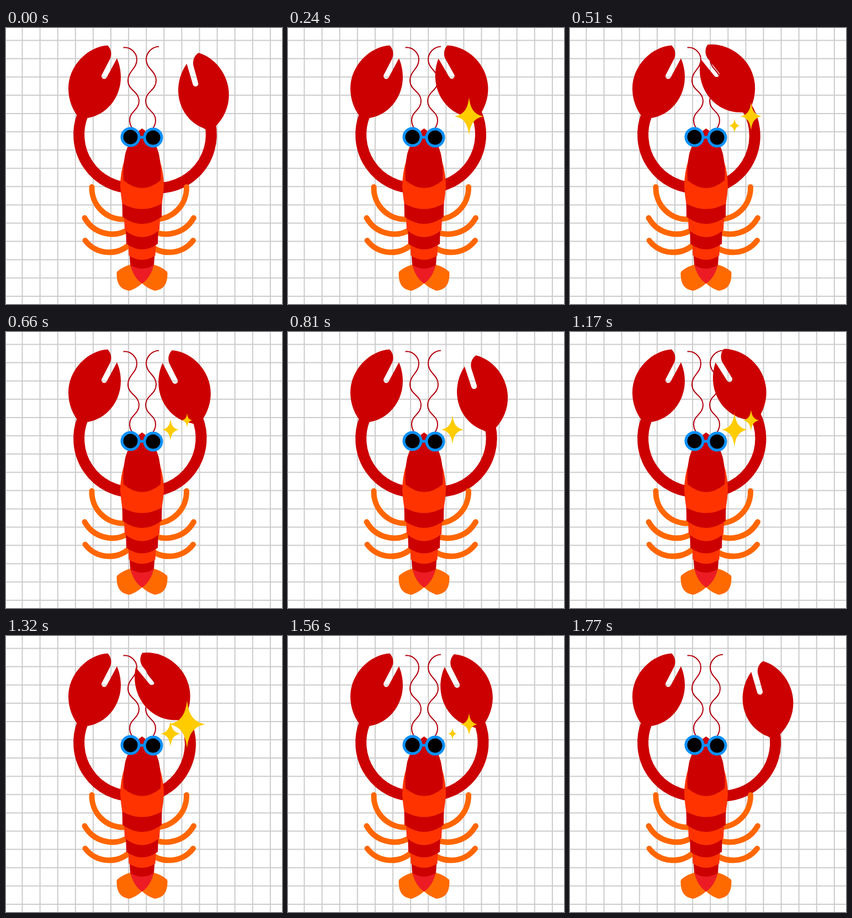
Write an HTML page that moves like this. It is 500 by 500 pixels and loops after 1.8 s.

```html
<!DOCTYPE html>
<html>
<head>
<meta charset="utf-8">
<title>Lobster</title>
<style>
html, body { margin: 0; width: 100%; height: 100%; overflow: hidden; background: #fff; }
svg { display: block; width: 100vw; height: 100vh; }
.line { fill: none; }
</style>
</head>
<body>
<svg viewBox="0 0 500 500">
  <defs>
    <path id="claw" fill="#c00" d="M184 31.5 C148 34 113 68 113 110 C113 132 122 151 133 164 C138 165 143 165 148 163 C181 158 208 127 208 89 C208 76 205 64 201 55 L182.500 89.500 A5 5 0 0 1 173.500 85 L188.500 56 C192 48 191 38 184 31.500Z"/>
    <g id="legs" class="line" stroke="#f60" stroke-width="10" stroke-linecap="round">
      <path d="M155.500 288 A57 57 0 0 0 216 346.500"/>
      <path d="M142.500 344 A57 57 0 0 0 222 365"/>
      <path d="M143.500 385 A55 55 0 0 0 224 392"/>
    </g>
    <path id="fin" fill="#ff6a00" d="M230 428 Q215 430 203 440 Q200 441 200.500 447 Q201 474 224 476 Q238 471 247 462 L247 434Z"/>
    <path id="star" fill="#fc0" d="M0 -1.3 C.1 -.45 .4 -.12 1 0 C.4 .12 .1 .45 0 1.3 C-.1 .45 -.4 .12 -1 0 C-.4 -.12 -.1 -.45 0 -1.3Z"/>
  </defs>

  <path id="grid" class="line" stroke="#ccc" stroke-width="2"/>

  <g class="line" stroke="#b3000c" stroke-width="2">
    <path d="M212.500 35.500 C226 34 237 45 237 57 C237 74 221 78 221 95 C221 113 241 115 241 132 C241 149 224 151 224 167 Q224 175 229 182"/>
    <path d="M277 33.500 C264 34 254 45 254 57 C254 74 272 78 272 95 C272 113 253 115 253 132 C253 149 271 151 271 167 Q271 175 266 182"/>
  </g>

  <path class="line" stroke="#c00" stroke-width="20" d="M139 157 A97 97 0 0 0 229 290"/>
  <use href="#claw"/>
  <g id="arm">
    <path class="line" stroke="#c00" stroke-width="20" d="M340 151.500 A97 97 0 0 1 252 289.500"/>
    <use href="#claw" transform="rotate(-2 315 95) translate(475 -1) scale(-1 1)"/>
  </g>

  <use href="#legs"/>
  <use href="#legs" transform="translate(482.500 0) scale(-1 1)"/>
  <use href="#fin"/>
  <use href="#fin" transform="translate(493 0) scale(-1 1)"/>
  <path fill="#ed1c24" d="M225 428 Q231 453 246.500 463 Q262 453 268 428Z"/>
  <g id="shell"></g>
  <path fill="#f30" d="M215 238 Q207 262 207 287 Q208 303 210.500 318 Q246.500 338 282.500 318 Q285 303 286 287 Q286 262 278 238Z"/>
  <path fill="#c00" d="M246.500 182 Q225 196 216 228 Q211 252 213 276 Q246.500 304 280 276 Q282 252 277 228 Q268 196 246.500 182Z"/>

  <g stroke="#0a90fa" stroke-width="5">
    <path d="M240 198 H252"/>
    <circle cx="225.500" cy="197.500" r="15.500"/>
    <circle cx="266.500" cy="198.500" r="15.500"/>
  </g>

  <use id="small" href="#star"/>
  <use id="big" href="#star"/>
</svg>
<script>
const LOOP = 1800, STEP = 30, SWING = 900;
const get = id => document.getElementById(id);

let grid = "";
for (let i = 0; i < 15; i++) {
  grid += `M${29.5 + 32.1 * i} 0V500M0 ${22.5 + 33.1 * i}H500`;
}
get("grid").setAttribute("d", grid);

// Tail rings: colour, top y, half width there, edge y, half width there, lowest y
const rings = [
  ["#c00", 400, 23.5, 429, 21.5, 436],
  ["#f30", 380, 25.5, 412, 24, 420],
  ["#c00", 360, 29.5, 391, 28.5, 401],
  ["#f30", 335, 33, 366, 31.5, 379],
  ["#c00", 312, 36, 342, 35.5, 355]
];
get("shell").innerHTML = rings.map(([fill, top, a, edge, b, low]) =>
  `<path fill="${fill}" d="M${246.5 - a} ${top}L${246.5 - b} ${edge}
   Q246.5 ${2 * low - edge} ${246.5 + b} ${edge}L${246.5 + a} ${top}Z"/>`).join("");

// Closing angle of the claw, evenly spaced over one swing
const angles = [2.2, 6.6, 14, 20, 23.3, 22.8, 16.6, 8.8, 3.7, 0];
const angleStart = 60, restAngle = 14;

function swing(t) {
  const n = angles.length;
  const pos = ((t - angleStart + SWING) % SWING) / (SWING / n);
  const i = Math.floor(pos), s = pos - i;
  const [a, b, c, d] = [-1, 0, 1, 2].map(k => angles[(i + k + n) % n]);
  return b + s / 2 * (c - a + s * (2 * a - 5 * b + 4 * c - d + s * (3 * (b - c) + d - a)));
}

function ramp(keys, t) {
  const i = keys.findIndex(k => k[0] > t);
  const [t0, v0] = keys[i - 1], [t1, v1] = keys[i];
  return v0 + (v1 - v0) * (t - t0) / (t1 - t0);
}

const bigKeys = [[0, 0], [300, 33], [810, 0], [1050, 0], [1320, 33], [1770, 0], [1800, 0]];
const smallKeys = [[0, 0], [210, 0], [1050, 28.5], [1770, 0], [1800, 0]];

function place(id, x, y, size) {
  get(id).setAttribute("transform", `translate(${x} ${y}) scale(${size})`);
}

function draw(now) {
  const t = Math.floor((now % LOOP) / STEP) * STEP;
  get("arm").setAttribute("transform", `rotate(${restAngle - swing(t)} 262 287)`);
  place("big", 328, 160, ramp(bigKeys, t));
  place("small", 298, 177, ramp(smallKeys, t));
}

const start = performance.now();
function tick() {
  draw(performance.now() - start);
  requestAnimationFrame(tick);
}
tick();
</script>
</body>
</html>
```
